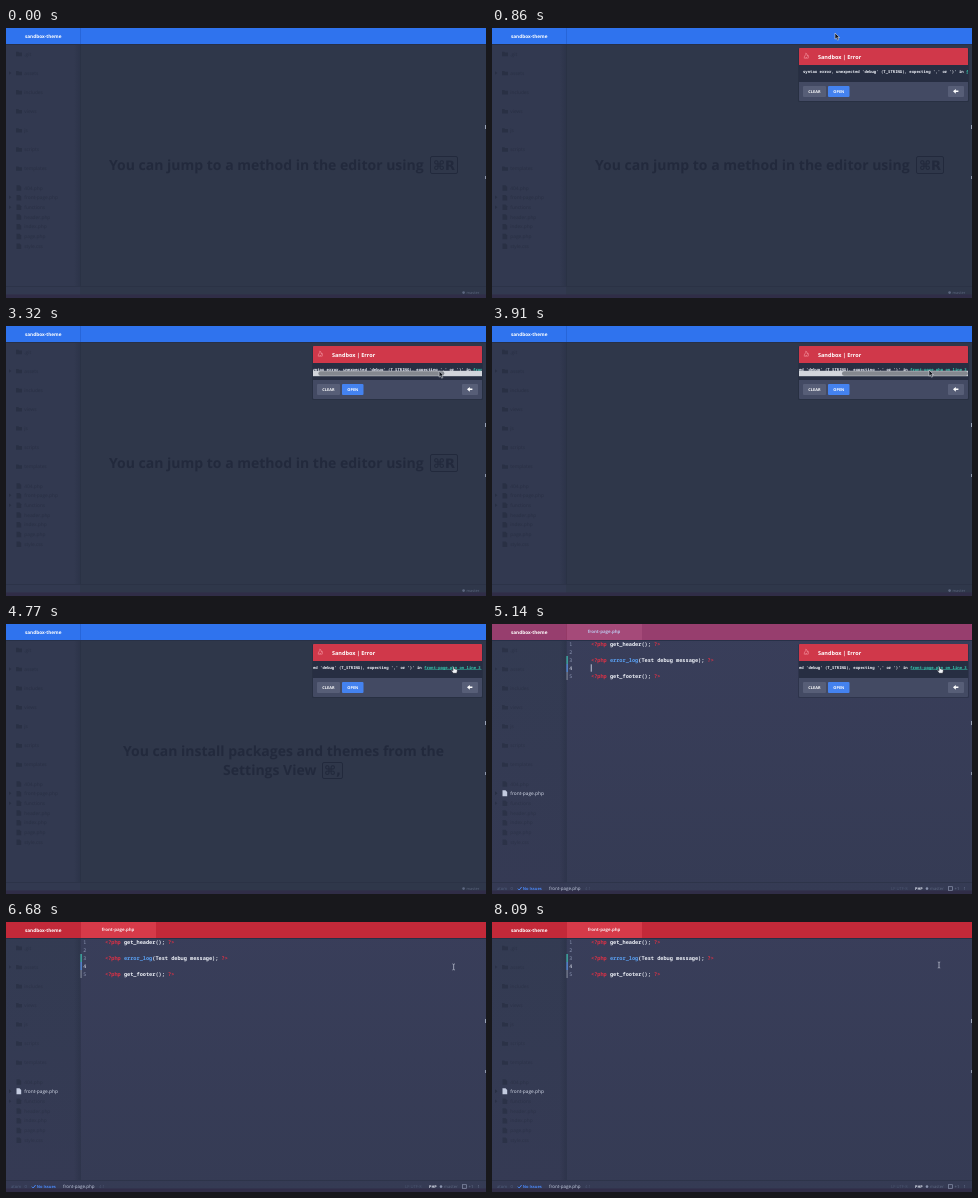
Animation of 480x270 px, one loop 8130 ms. Source, as an HTML page:

```html
<!DOCTYPE html>
<html lang="en">
<head>
<meta charset="utf-8">
<title>Editor error notification</title>
<style>
html, body { margin: 0; width: 100%; height: 100%; overflow: hidden; background: #2f374a; }
svg { display: block; width: 100vw; height: 100vh; }
text { font-family: "Open Sans", "Noto Sans", sans-serif; text-rendering: geometricPrecision; white-space: pre; }
.b { font-weight: 700; }
.mono { font-family: "Noto Sans Mono", "DejaVu Sans Mono", monospace; }
.key { font-family: "DejaVu Sans", sans-serif; }
.mid { text-anchor: middle; }
</style>
</head>
<body>
<svg id="stage" viewBox="0 0 480 270" xmlns="http://www.w3.org/2000/svg">
  <defs>
    <linearGradient id="edge"><stop offset="0" stop-color="#20283a" stop-opacity="0"/><stop offset="1" stop-color="#20283a" stop-opacity=".35"/></linearGradient>
    <linearGradient id="editorBg" x2="0" y2="1"><stop offset="0" stop-color="#393e5a"/><stop offset="1" stop-color="#353b54"/></linearGradient>
    <linearGradient id="sideBg" x2="0" y2="1"><stop offset="0" stop-color="#333b52"/><stop offset="1" stop-color="#353a54"/></linearGradient>
    <clipPath id="msgClip"><rect x="307" y="37" width="169" height="17"/></clipPath>
  </defs>

  <rect width="480" height="270" fill="#2f374a"/>
  <rect width="74" height="270" fill="#323950"/>
  <g id="openBg">
    <rect x="74" width="406" height="270" fill="url(#editorBg)"/>
    <rect width="74" height="270" fill="url(#sideBg)"/>
  </g>
  <rect x="68" y="16" width="7" height="242" fill="url(#edge)"/>
  <rect y="258" width="480" height="1" fill="#293044" opacity=".6"/>
  <rect y="266.5" width="480" height="3.5" fill="#302d47"/>
  <rect x="479" y="97" width="1" height="4" fill="#9aa3b8"/>
  <rect x="479" y="148" width="1" height="3" fill="#8d96ab"/>

  <g id="tree" fill="#293044"></g>
  <g id="treeActive">
    <path d="M3 167.6l2.4 1.7-2.4 1.7z" fill="#293044"/>
    <path d="M10.5 166.3h3l1.7 1.7v4.2h-4.7z" fill="#c3cbe0"/>
    <text x="18.3" y="171.2" font-size="4.8" fill="#d5dbea">front-page.php</text>
  </g>

  <g id="hintA" fill="#20273a">
    <text class="b" x="103" y="142.3" font-size="14">You can jump to a method in the editor using</text>
    <rect x="424.5" y="128.5" width="27" height="17" rx="1.5" fill="none" stroke="#20273a"/>
    <text class="key mid b" x="438" y="142" font-size="13">⌘R</text>
  </g>
  <g id="hintB" fill="#20273a">
    <text class="b mid" x="277.5" y="132.3" font-size="14">You can install packages and themes from the</text>
    <text class="b" x="217" y="151.3" font-size="14">Settings View</text>
    <rect x="316.5" y="138.5" width="20" height="16" rx="1.5" fill="none" stroke="#20273a"/>
    <text class="key mid b" x="326.5" y="151.3" font-size="13">⌘,</text>
  </g>

  <rect y="16" width="480" height="1" fill="#273047"/>
  <rect width="480" height="16" fill="#2f73ee"/>
  <rect x="74" width="1" height="16" fill="#2765d8"/>
  <g id="redBar">
    <rect width="480" height="16" fill="#c32939"/>
    <rect x="75" width="75" height="16" fill="#d63a49"/>
    <text class="b mid" x="112" y="9.2" font-size="4.4" fill="#f8e3e6">front-page.php</text>
  </g>
  <text class="b mid" x="37.2" y="9.6" font-size="4.7" fill="#fff">sandbox-theme</text>

  <g id="code" class="mono">
    <rect x="74.5" y="32" width="1.2" height="8" fill="#3fc3b4"/>
    <rect x="74.5" y="40" width="1.2" height="8" fill="#5f9df5"/>
    <rect x="74.5" y="48" width="1.2" height="8" fill="#7c8496"/>
    <g id="lines"></g>
    <rect id="caret" x="98.8" y="40.3" width=".8" height="7.4" fill="#dfe6f7"/>
  </g>

  <g id="statusIdle" fill="#5d6780">
    <circle cx="457.6" cy="264.6" r="1.3"/>
    <text x="460.5" y="266" font-size="3.9">master</text>
  </g>
  <g id="statusOpen" font-size="4.2">
    <text x="5" y="266" fill="#53607f">atom</text>
    <text x="18.5" y="266" fill="#53607f">0</text>
    <path d="M25.8 264.6l1.4 1.4 2.4-3" fill="none" stroke="#4a86f2" stroke-width="1"/>
    <text class="b" x="30.7" y="266" font-size="4" fill="#4a86f2">No Issues</text>
    <text x="57" y="266" font-size="4.5" fill="#c5cce0">front-page.php</text>
    <text x="93" y="266" fill="#4b5570">4:1</text>
    <text x="399" y="266" fill="#4b5570">LF UTF-8</text>
    <text class="b" x="423" y="266" font-size="3.8" fill="#dfe4f0">PHP</text>
    <circle cx="435" cy="264.6" r="1.3" fill="#8a93ad"/>
    <text x="438" y="266" fill="#5d6780">master</text>
    <rect x="456.5" y="262.7" width="4" height="3.6" fill="none" stroke="#8a93ad" stroke-width=".7"/>
    <text x="462.5" y="266" fill="#6a748f">+1</text>
    <text x="471.5" y="266" fill="#6a748f">1</text>
  </g>

  <g id="note">
    <rect x="306" y="20" width="171" height="54" rx="1.5" fill="#1c2334" opacity=".35"/>
    <rect x="307" y="20" width="169" height="53" rx="1" fill="#434a63"/>
    <path d="M307 37v-16q0-1 1-1h167q1 0 1 1v16z" fill="#d0384a"/>
    <rect x="307" y="37" width="169" height="17" fill="#272e42"/>
    <path d="M312.4 30.6q-.6-2 .8-3.2 1-1 .6-2.3 2 1.2 1.6 3 .5-.2.6-.9 1 2-.2 3.4M313.6 30.8q0-1.2.8-1.8.6.9.5 1.8" fill="none" stroke="#f2909b" stroke-width=".7"/>
    <text class="b" x="326" y="30.6" font-size="5.5" fill="#fff">Sandbox | Error</text>
    <g clip-path="url(#msgClip)">
      <g id="msg">
        <text class="mono b" x="311" y="44.7" font-size="3.95" fill="#f0f3fa">syntax error, unexpected 'debug' (T_STRING), expecting ',' or ')' in <tspan fill="#35c6ad">front-page.php on line 3</tspan></text>
        <rect x="474.5" y="45.4" width="57" height=".5" fill="#35c6ad"/>
      </g>
      <g id="scrollbar">
        <rect x="307" y="44.8" width="169" height="5.4" fill="#d2d5dc"/>
        <rect id="thumb" x="307" y="45.3" width="126" height="4.4" rx="2.2" fill="#84888f"/>
      </g>
    </g>
    <rect x="311" y="58" width="23" height="11" rx="1" fill="#575e77"/>
    <rect x="336" y="58" width="21.5" height="11" rx="1" fill="#4482ef"/>
    <rect x="456" y="58" width="16" height="11" rx="1" fill="#575e77"/>
    <g class="b mid" font-size="3.9" fill="#fff">
      <text x="322.4" y="65">CLEAR</text>
      <text x="346.8" y="65">OPEN</text>
    </g>
    <path d="M461 63.3l2.8-2.4v1.6h2.6v1.6h-2.6v1.6z" fill="#fff"/>
  </g>

  <g id="pointer">
    <path id="arrow" d="M0 0v6.2l1.5-1.3 1 2.3 1.2-.5-1-2.2h1.9z" fill="#10131b" stroke="#d9dde6" stroke-width=".6"/>
    <path id="hand" d="M-1.1-3.2q.8-.7 1.3.1l.3 2 2 .4q1.2.4.9 1.6l-.6 2.4h-3.6l-1.9-2.6q0-.9 1.1-.5l.6.5z" fill="#f2f4f8" stroke="#161a26" stroke-width=".6"/>
    <path id="beam" d="M-1.2-3q1 0 1.2.6.2-.6 1.2-.6M0-2.4v4.8M-1.2 3q1 0 1.2-.6.2.6 1.2.6" fill="none" stroke="#c9cfdd" stroke-width=".7"/>
  </g>
</svg>
<script>
const LOOP = 8130, OPEN = 5000, SHOW = 350, HIDE_END = 5411;
const el = id => document.getElementById(id);
const set = (id, name, value) => el(id).setAttribute(name, value);
const fade = (id, value) => set(id, 'opacity', value);
const clamp = v => Math.min(1, Math.max(0, v));
const ramp = (t, from, span) => clamp((t - from) / span);
const smooth = u => u * u * (3 - 2 * u);

// Eased value from rows of [time, ...values].
function track(rows, t) {
  if (t <= rows[0][0]) return rows[0].slice(1);
  for (let i = 1; i < rows.length; i++) {
    const a = rows[i - 1], b = rows[i];
    if (t < b[0]) {
      const u = smooth((t - a[0]) / (b[0] - a[0]));
      return a.slice(1).map((v, k) => v + (b[k + 1] - v) * u);
    }
  }
  return rows[rows.length - 1].slice(1);
}

const pointerPath = [
  [640, 336, -9], [860, 343, 5], [1500, 398, 44], [2050, 424, 53], [2450, 431, 55],
  [2910, 431, 55], [3250, 433, 45], [3900, 437, 44], [4050, 437, 44], [4600, 448, 46],
  [6600, 448, 46], [6800, 447, 43]
];
const scrollPath = [[3200, 0], [3750, 56]];
const barPath = [[3180, 0], [3240, 1], [4150, 1], [4400, 0]];
const hidePath = [[5220, 0], [5310, .35], [5355, .86], [5410, .88], [HIDE_END, 1]];

function buildTree() {
  const folders = ['.git', 'assets', 'includes', 'views', 'js', 'scripts', 'templates'];
  const files = ['404.php', 'front-page.php', 'functions', 'header.php', 'index.php', 'page.php', 'style.css'];
  const label = (name, y) => `<text x="18.3" y="${y + 1.8}" font-size="4.8">${name}</text>`;
  const rows = folders.map((name, i) => {
    const y = 26 + 19.1 * i;
    return `<path d="M10 ${y - 2.2}h2.3l.7.8h3v3.6h-6z"/>` + label(name, y);
  });
  files.forEach((name, i) => {
    const y = 159.8 + 9.7 * i, active = i === 1;
    rows.push(`<g${active ? ' id="treeIdle"' : ''}><path d="M10.5 ${y - 2.6}h3l1.7 1.7v3.8h-4.7z"/>${label(name, y)}</g>`);
  });
  [45, 169.3, 179.2].forEach(y => rows.push(`<path d="M3 ${y - 1.7}l2.4 1.7-2.4 1.7z"/>`));
  el('tree').innerHTML = rows.join('');
}

function buildCode() {
  const red = '#dc3145', white = '#eef1f8', blue = '#5aa2f5';
  const php = (name, args, color) => [['<?php ', red], [name, color], [args + '; ', white], ['?>', red]];
  const lines = [
    php('get_header', '()', white), [],
    php('error_log', '(Test debug message)', blue), [],
    php('get_footer', '()', white)
  ];
  const esc = s => s.replace('<', '&lt;').replace('>', '&gt;');
  el('lines').innerHTML = lines.map((parts, i) => {
    const y = 22 + 7.95 * i;
    const spans = parts.map(([s, c]) => `<tspan fill="${c}">${esc(s)}</tspan>`).join('');
    return `<text class="mono" x="77.3" y="${y}" font-size="5" fill="${i === 3 ? '#e3e8f4' : '#8e98b5'}">${i + 1}</text>` +
      `<text class="mono" x="99" y="${y}" font-size="5.25" font-weight="600">${spans}</text>`;
  }).join('');
}

function drawNote(t) {
  const show = ramp(t, SHOW, 160), grow = 1 - (1 - show) ** 3;
  const hide = track(hidePath, t)[0], s = 1 - .2 * hide;
  fade('note', t < SHOW || t >= HIDE_END ? 0 : grow * (1 - hide));
  set('note', 'transform',
    `translate(391.5 ${46.5 - 15 * (1 - grow)}) scale(${s} ${s * Math.max(.02, grow)}) translate(-391.5 -46.5)`);
  const x = track(scrollPath, t)[0];
  set('msg', 'transform', `translate(${-x} 0)`);
  set('thumb', 'x', 307 + x * 43 / 56);
  fade('scrollbar', track(barPath, t)[0]);
}

function drawPointer(t) {
  const [x, y] = track(pointerPath, t);
  const shape = t < 4450 ? 'arrow' : t < 6600 ? 'hand' : 'beam';
  set('pointer', 'transform', `translate(${x} ${y})`);
  for (const id of ['arrow', 'hand', 'beam']) fade(id, id === shape ? 1 : 0);
}

function draw(t) {
  const open = t >= OPEN ? 1 : 0;
  for (const id of ['openBg', 'code', 'statusOpen', 'treeActive']) fade(id, open);
  for (const id of ['statusIdle', 'treeIdle']) fade(id, 1 - open);
  fade('tree', open ? .75 : 1);
  fade('redBar', ramp(t, OPEN, 200));
  fade('hintA', .82 * (1 - ramp(t, 3600, 300)));
  fade('hintB', open ? 0 : .82 * ramp(t, 3960, 300));
  fade('caret', (t - 5100 + 800) % 800 < 400 ? 1 : 0);
  drawNote(t);
  drawPointer(t);
}

buildTree();
buildCode();
const start = performance.now();
function tick() {
  draw((performance.now() - start) % LOOP);
  requestAnimationFrame(tick);
}
tick();
</script>
</body>
</html>
```
